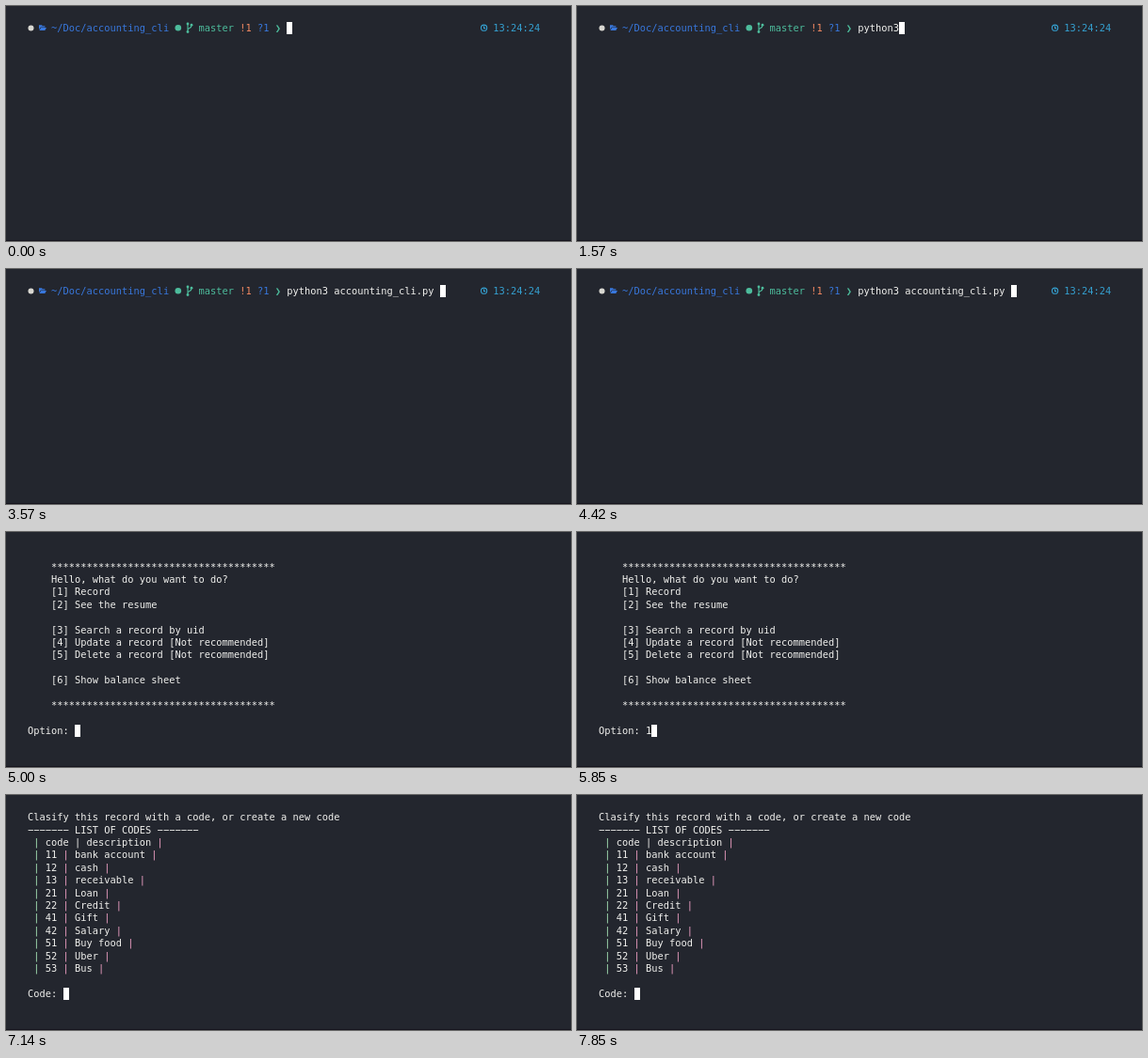
These frames come from a looping animation (600x250 px, 8000 ms). An HTML page with a canvas:

```html
<!DOCTYPE html>
<html lang="en">
<head>
<meta charset="utf-8">
<title>Terminal session</title>
<style>
  html, body { margin: 0; width: 100%; height: 100%; overflow: hidden; background: #23262e; }
  canvas { display: block; }
</style>
</head>
<body>
<canvas id="stage" width="600" height="250"></canvas>
<script>
const ctx = document.getElementById('stage').getContext('2d');

const LOOP = 8000;
const LEFT = 23, TOP = 17, CELL = 6.255, ROW = 13.4, BASELINE = 10.1;
const FONT_SIZE = 100, SCALE = CELL / 60.2;
const COLOR = {
  bg: '#23262e', edge: '#15141d', text: '#f1f1ee', cursor: '#ffffff',
  blue: '#3877dc', green: '#4dbc9c', orange: '#f58a62', cyan: '#35a0d0',
  pipeGreen: '#a5e3b5', pipePink: '#ee9fc4'
};

const colX = col => LEFT + col * CELL;
const rowY = row => TOP + row * ROW;

function write(str, col, row, color = COLOR.text) {
  ctx.save();
  ctx.translate(colX(col), rowY(row) + BASELINE);
  ctx.scale(SCALE, SCALE);
  ctx.font = FONT_SIZE + 'px "DejaVu Sans Mono", monospace';
  ctx.fillStyle = color;
  ctx.fillText(str, 0, 0);
  ctx.restore();
}

function cursor(col, row) {
  ctx.fillStyle = COLOR.cursor;
  ctx.fillRect(Math.round(colX(col)), Math.round(rowY(row)), 6, 13);
}

function dot(x, y, r, color) {
  ctx.fillStyle = color;
  ctx.beginPath();
  ctx.arc(x, y, r, 0, Math.PI * 2);
  ctx.fill();
}

function shape(points, color) {
  ctx.fillStyle = color;
  ctx.beginPath();
  points.forEach(([x, y]) => ctx.lineTo(x, y));
  ctx.fill();
}

function folder() {
  shape([[35, 25], [35, 20.3], [38, 20.3], [38.8, 21.2], [41.4, 21.2], [41.4, 22.4], [37, 22.4]], COLOR.blue);
  shape([[35.4, 26], [37.2, 22.9], [43, 22.9], [41.3, 26]], COLOR.blue);
}

function branch() {
  ctx.strokeStyle = COLOR.green;
  ctx.lineWidth = 1.1;
  ctx.beginPath();
  ctx.moveTo(193, 19);
  ctx.lineTo(193, 27.5);
  ctx.moveTo(197, 20.5);
  ctx.bezierCurveTo(197, 24.5, 193.4, 22.6, 193, 25.6);
  ctx.stroke();
  dot(193, 19, 1.4, COLOR.green);
  dot(193, 27.5, 1.4, COLOR.green);
  dot(197, 20.2, 1.4, COLOR.green);
}

function clock() {
  ctx.strokeStyle = COLOR.cyan;
  ctx.lineWidth = 1.1;
  ctx.beginPath();
  ctx.arc(507.6, 23.2, 3.1, 0, Math.PI * 2);
  ctx.moveTo(507.6, 21.2);
  ctx.lineTo(507.6, 23.6);
  ctx.lineTo(509.2, 23.6);
  ctx.stroke();
}

function shell(command) {
  dot(26.5, 23.5, 3, '#d9d8d2');
  folder();
  write('~/Doc/accounting_cli', 4, 0, COLOR.blue);
  dot(182.8, 23.3, 3.3, COLOR.green);
  branch();
  write('master', 29, 0, COLOR.green);
  write('!1', 36, 0, COLOR.orange);
  write('?1', 39, 0, COLOR.blue);
  write('❯', 42, 0, COLOR.green);
  write(command, 44, 0);
  cursor(44 + command.length, 0);
  clock();
  write('13:24:24', 79, 0, COLOR.cyan);
}

// Last line is the prompt, followed by the cursor.
function page(lines) {
  lines.forEach((line, row) => write(line, 0, row));
  cursor(lines[lines.length - 1].length, lines.length - 1);
}

const indent = '    ';
const stars = n => indent + '*'.repeat(n);
const menu = [
  '',
  stars(38),
  indent + 'Hello, what do you want to do?',
  indent + '[1] Record',
  indent + '[2] See the resume',
  '',
  indent + '[3] Search a record by uid',
  indent + '[4] Update a record [Not recommended]',
  indent + '[5] Delete a record [Not recommended]',
  '',
  indent + '[6] Show balance sheet',
  '',
  stars(38),
  ''
];
const datePage = [
  ...menu.slice(8),
  'Option: 1',
  '',
  stars(26),
  indent + indent + 'CREATING NEW RECORD...',
  '',
  stars(26),
  '', '',
  "Record's date [dd/mm/yyyy] Today as default: "
];
const codes = [
  ['code', 'description'], [11, 'bank account'], [12, 'cash'], [13, 'receivable'],
  [21, 'Loan'], [22, 'Credit'], [41, 'Gift'], [42, 'Salary'],
  [51, 'Buy food'], [52, 'Uber'], [53, 'Bus']
];

function codePage() {
  const rule = '−'.repeat(7);
  write('Clasify this record with a code, or create a new code', 0, 0);
  write(`${rule} LIST OF CODES ${rule}`, 0, 1);
  codes.forEach(([code, name], i) => {
    const row = i + 2, mid = 4 + String(code).length, end = mid + 3 + name.length;
    write('|', 1, row, COLOR.pipeGreen);
    write(String(code), 3, row);
    write('|', mid, row, i ? COLOR.pipePink : COLOR.text);
    write(name, mid + 2, row);
    write('|', end, row, COLOR.pipePink);
  });
  write('Code: ', 0, 14);
  cursor(6, 14);
}

const typed = 'python3 accounting_cli.py ';
// Times at which each further key lands; the last one completes the file name.
const keys = [570, 710, 850, 1000, 1140, 1280, 1430, 1850, 2280, 2570, 3140, 3570];

function command(t) {
  const count = keys.filter(k => t >= k).length;
  return count === keys.length ? typed : typed.slice(0, count);
}

function draw(t) {
  ctx.fillStyle = COLOR.bg;
  ctx.fillRect(0, 0, 600, 250);
  ctx.fillStyle = COLOR.edge;
  ctx.fillRect(0, 249, 600, 1);
  if (t < 4710) shell(command(t));
  else if (t < 5570) page([...menu, 'Option: ']);
  else if (t < 6000) page([...menu, 'Option: 1']);
  else if (t < 7140) page(datePage);
  else codePage();
}

const start = performance.now();
function tick() {
  draw((performance.now() - start) % LOOP);
  requestAnimationFrame(tick);
}
tick();
</script>
</body>
</html>
```
